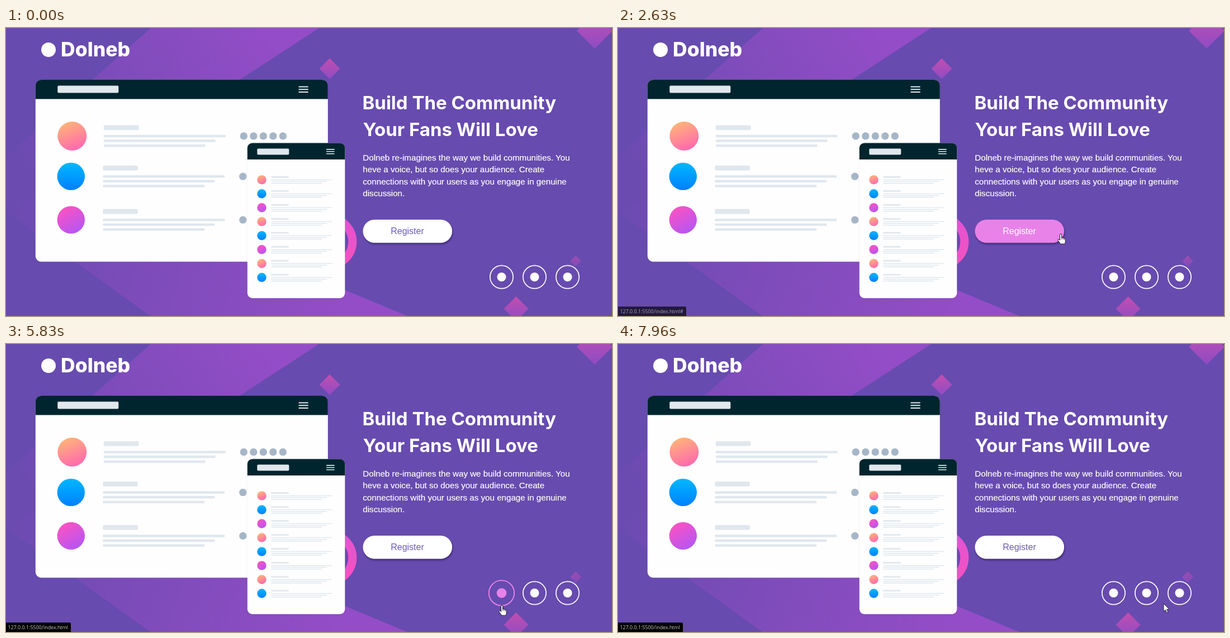
Write an HTML page that moves like this. It is 1084x517 px and loops after 8000 ms.

```html
<!DOCTYPE html>
<html lang="en">
<head>
<meta charset="utf-8">
<title>Community landing page</title>
<style>
  html, body { margin: 0; width: 100%; height: 100%; overflow: hidden; background: #674baf; }
  svg { display: block; width: 1084px; height: 517px; }
  .title { font: 700 33px Inter, sans-serif; fill: #fff; }
  .brand { font: 800 35.5px Inter, sans-serif; fill: #fff; }
  .body { font: 15.15px "Liberation Sans", Arial, sans-serif; fill: #fff; stroke: #fff; stroke-width: .2px; }
  .label { font: 16px "Liberation Sans", Arial, sans-serif; text-anchor: middle; }
  .status { font: 8.9px "Open Sans", sans-serif; fill: #c9ccd1; }
</style>
</head>
<body>
<svg viewBox="0 0 1084 517">
  <defs>
    <linearGradient id="bandTop" gradientUnits="userSpaceOnUse" x1="40" y1="270" x2="460" y2="-20">
      <stop offset="0" stop-color="#6b4bb0"/><stop offset="1" stop-color="#944dc7"/>
    </linearGradient>
    <linearGradient id="bandBottom" gradientUnits="userSpaceOnUse" x1="0" y1="320" x2="600" y2="540">
      <stop offset="0" stop-color="#6b4bb0"/><stop offset="1" stop-color="#944dc7"/>
    </linearGradient>
    <linearGradient id="gem" x1="0" y1="0" x2="0" y2="1">
      <stop offset="0" stop-color="#c24eb0"/><stop offset="1" stop-color="#8f4cc4"/>
    </linearGradient>
    <linearGradient id="ring" x1="0" y1="0" x2="0" y2="1">
      <stop offset="0" stop-color="#e154d2"/><stop offset="1" stop-color="#f552c0"/>
    </linearGradient>
    <linearGradient id="orange" x1=".3" y1="0" x2=".7" y2="1">
      <stop offset="0" stop-color="#ffb578"/><stop offset="1" stop-color="#ff66b0"/>
    </linearGradient>
    <linearGradient id="blue" x1="0" y1="0" x2="0" y2="1">
      <stop offset="0" stop-color="#00b8ff"/><stop offset="1" stop-color="#0080ff"/>
    </linearGradient>
    <linearGradient id="pink" x1=".2" y1="0" x2=".8" y2="1">
      <stop offset="0" stop-color="#ff52c0"/><stop offset="1" stop-color="#b056f6"/>
    </linearGradient>
    <filter id="shadow" x="-10%" y="-20%" width="120%" height="160%">
      <feDropShadow dx="1" dy="2.5" stdDeviation="1.8" flood-color="#1c0f45" flood-opacity=".6"/>
    </filter>
    <filter id="soft" x="-10%" y="-10%" width="120%" height="120%">
      <feDropShadow dx="0" dy="0" stdDeviation="1.2" flood-color="#123" flood-opacity=".15"/>
    </filter>
  </defs>

  <rect width="1084" height="517" fill="#674baf"/>
  <path d="M259 0H560L300 170L0 332V230Z" fill="url(#bandTop)"/>
  <path d="M0 330L300 170L560 451L718 517H258Z" fill="url(#bandBottom)"/>
  <g id="gems" fill="url(#gem)"></g>
  <circle cx="577.3" cy="383.5" r="42.5" fill="none" stroke="url(#ring)" stroke-width="15"/>
  <g id="windows" transform="translate(.3 .4)"></g>

  <circle cx="76" cy="39" r="13" fill="#fff"/>
  <text class="brand" x="98" y="51">Dolneb</text>
  <text class="title" x="637.5" y="146">Build The Community</text>
  <text class="title" x="638.5" y="194">Your Fans Will Love</text>
  <g id="copy" class="body"></g>

  <rect id="button" x="638.5" y="344" width="159.5" height="41.5" rx="20.75" filter="url(#shadow)"/>
  <text id="label" class="label" x="718" y="370">Register</text>
  <g id="socials"></g>

  <g id="status">
    <path id="statusBox" d="M0 500H114a2 2 0 0 1 2 2V517H0Z"/>
    <text id="statusText" class="status" x="3.5" y="512"></text>
  </g>
  <path id="arrow" d="M0 0V14.2L3.3 11.2L5.6 16.4L8 15.3L5.7 10.3H10Z"
        fill="#fff" stroke="#16121f" stroke-width=".9" stroke-linejoin="round"/>
  <g id="hand" stroke="#16121f" stroke-linejoin="round" stroke-linecap="round">
    <path fill="#fff" d="M-1.6 1.6a1.6 1.6 0 0 1 3.2 0V7q1.4-1 2.6 .4q1.4-.8 2.3 .7q1.7-.4 1.8 1.5
      V14q0 2-1.5 4.3H-.6Q-1.4 16-5 11.8q-.8-1.7 .7-2.2q1.2-.2 2.7 1.6Z"/>
    <path fill="none" stroke-width=".7" d="M1.6 7V10M4.2 7.6V10.3M6.5 8.4V10.6"/>
  </g>
</svg>

<script>
const LOOP = 8000;
const HOVER = [232, 130, 232], WHITE = [255, 255, 255], VIOLET = [108, 92, 190];
const TINTS = ['url(#orange)', 'url(#blue)', 'url(#pink)'];
const $ = id => document.getElementById(id);

function add(parent, tag, attrs, text = '') {
  const el = document.createElementNS('http://www.w3.org/2000/svg', tag);
  for (const key in attrs) el.setAttribute(key, attrs[key]);
  el.textContent = text;
  return parent.appendChild(el);
}
const windows = $('windows');
const bar = (x, y, width, height, rx = 1, fill = '#e0e7ed') =>
  add(windows, 'rect', { x, y, width, height, rx, fill });
const disc = (cx, cy, r, fill) => add(windows, 'circle', { cx, cy, r, fill });
const gem = (x, y, r, opacity = 1) =>
  add($('gems'), 'path', { d: `M${x} ${y - r}l${r} ${r}l${-r} ${r}l${-r} ${-r}Z`, opacity });

gem(579, 73, 18.5);
gem(1053, 5, 32);
gem(912.5, 504, 22);
gem(1019, 418.5, 10, .6);

function frame(x, y, w, h, head, r) {
  bar(x, y, w, h, r, '#fefeff').setAttribute('filter', 'url(#soft)');
  add(windows, 'path', {
    fill: '#00252e',
    d: `M${x} ${y + head}v${r - head}a${r} ${r} 0 0 1 ${r} ${-r}h${w - 2 * r}a${r} ${r} 0 0 1 ${r} ${r}v${head - r}Z`
  });
}
function menu(x, y, w, gap, thick) {
  for (let i = 0; i < 3; i++) bar(x, y + i * gap, w, thick, .8);
}
// A heading bar above three ever shorter lines
function post(x, y, s, titleHeight, lineHeight, gap, width, shrink) {
  bar(x, y - s, width * .287, titleHeight, titleHeight / 4);
  for (let k = 0; k < 3; k++)
    bar(x, y - lineHeight / 2 + k * gap, width - k * shrink, lineHeight, lineHeight / 3);
}

// Desktop window
frame(52.5, 92.5, 523, 326.5, 34.5, 10);
bar(92, 103, 109, 13, 2);
menu(523, 104, 17.5, 4.8, 2);
[193.5, 266, 344].forEach((y, i) => {
  const first = i == 0;
  disc(first ? 118 : 116, y, first ? 26 : 24.7, TINTS[i]);
  post(first ? 174.5 : 173, y, 19.5, 8.8, 4.5, 8.7, 218, 18);
  for (let k = 0; k < (first ? 5 : 1); k++) disc((first ? 425 : 423.5) + k * 17.5, y, 6.7, '#a6b6c7');
});

// Phone window
frame(431.5, 206, 174.5, 278.5, 29.5, 9);
bar(449, 216, 57, 11, 2);
menu(572.5, 216.7, 15, 3.9, 1.6);
for (let i = 0; i < 8; i++) {
  const y = 272 + i * 25.05;
  disc(457.2, y, 8.2, TINTS[i % 3]);
  post(474, y, 6.3, 2.8, 1.5, 3.2, 109, 9);
}

['Dolneb re-imagines the way we build communities. You',
 'heve a voice, but so does your audience. Create',
 'connections with your users as you engage in genuine',
 'discussion.'].forEach((line, i) => add($('copy'), 'text', { x: 638.3, y: 238 + i * 21.4 }, line));

const socials = [0, 1, 2].map(i => {
  const g = add($('socials'), 'g', {});
  const ring = add(g, 'circle', { r: 20.6, fill: 'none', 'stroke-width': 1.7 });
  const mark = add(g, 'circle', { r: 8 });
  return { x: 886.5 + i * 59, g, ring, mark };
});

// Key points of the pointer: time, x, y
const path = [
  [500, 1076, 370], [1260, 878, 349], [2090, 793, 367], [3160, 791, 372], [3430, 781, 389],
  [3910, 810, 454], [4390, 856, 463], [4740, 864, 455], [5290, 874, 449], [5830, 887, 469],
  [6100, 891, 468], [6440, 933, 461], [7190, 940, 458], [7960, 976, 466]
];
function pointer(t) {
  const i = path.findIndex(key => key[0] >= t);
  if (i <= 0) return path.at(i).slice(1);
  const [t0, x0, y0] = path[i - 1], [t1, x1, y1] = path[i];
  const p = (t - t0) / (t1 - t0);
  return [x0 + (x1 - x0) * p, y0 + (y1 - y0) * p];
}

const ease = p => { p = Math.max(0, Math.min(1, p)); return p * p * (3 - 2 * p); };
const pulse = (t, on, off, fade) => ease((t - on) / fade) - ease((t - off) / fade);
const mix = (a, b, p) => `rgb(${a.map((v, i) => Math.round(v + (b[i] - v) * p))})`;

// When the pointer is over the button and the first two icons
const visits = [[2050, 3130], [4790, 6090], [6390, 7430]];

function draw(t) {
  const [press, ...levels] = visits.map(([on, off]) => pulse(t, on, off, 290));
  $('button').setAttribute('fill', mix(WHITE, HOVER, press));
  $('label').setAttribute('fill', mix(VIOLET, WHITE, press));

  socials.forEach(({ x, g, ring, mark }, i) => {
    const level = levels[i] || 0, color = mix(WHITE, HOVER, level);
    g.setAttribute('transform', `translate(${x} 447) scale(${1 + level * .1})`);
    ring.setAttribute('stroke', color);
    mark.setAttribute('fill', color);
  });

  const hash = t < 4500;
  $('status').setAttribute('opacity',
    pulse(t, 2540, 3640, 150) + pulse(t, 5270, 6370, 150) + pulse(t, 6470, LOOP, 150));
  $('statusText').textContent = '127.0.0.1:5500/index.html' + (hash ? '#' : '');
  $('statusBox').setAttribute('transform', `scale(${hash ? 122 / 116 : 1} 1)`);

  const pointing = visits.some(([on, off]) => t >= on && t < off);
  const at = `translate(${pointer(t)})`;
  for (const [id, shown] of [['arrow', t >= 500 && !pointing], ['hand', pointing]]) {
    $(id).setAttribute('transform', at);
    $(id).setAttribute('visibility', shown ? 'visible' : 'hidden');
  }
}

const origin = performance.now();
function tick() {
  draw((performance.now() - origin) % LOOP);
  requestAnimationFrame(tick);
}
tick();
</script>
</body>
</html>
```
